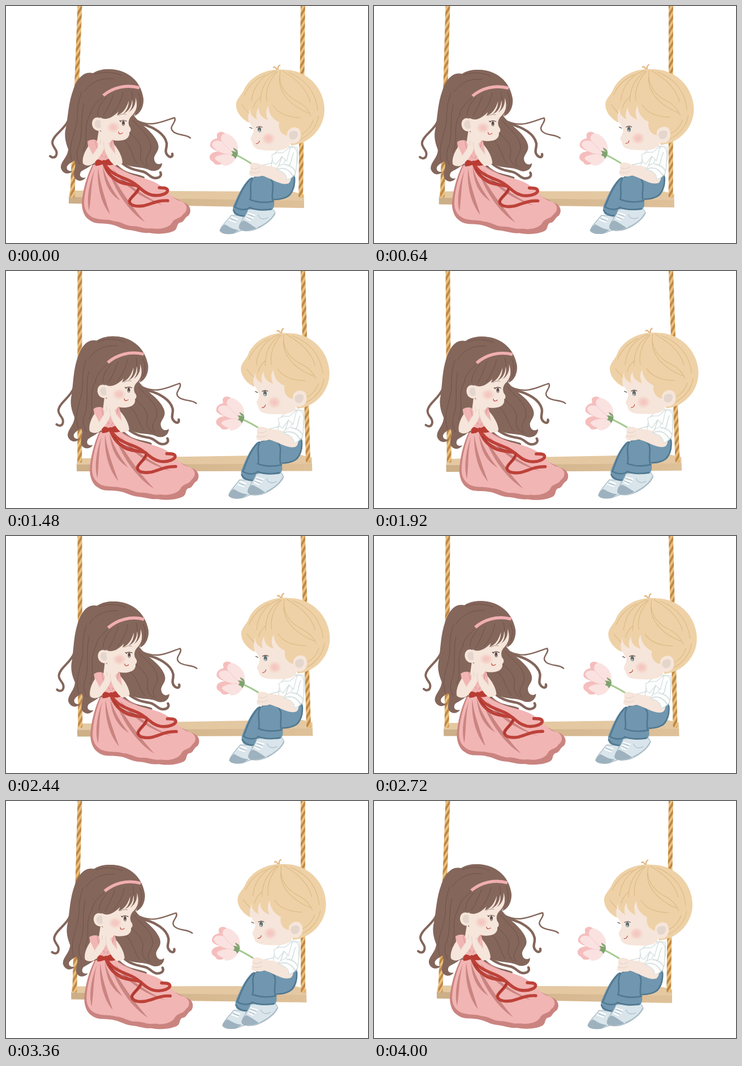
Recreate the animation shown at these times as an HTML page. Size 640 by 420 pixels, loop 4.04 s.

```html
<!DOCTYPE html>
<html lang="en">
<head>
<meta charset="utf-8">
<title>Two children on a swing</title>
<style>
html, body { margin: 0; width: 100%; height: 100%; overflow: hidden; background: #fff; }
svg { display: block; }
path, ellipse { fill: none; stroke-linecap: round; stroke-linejoin: round; }
.skin { fill: #f6e5da; }
.ear { fill: #e4d6cc; }
.line { stroke: #dfcabf; stroke-width: .8; }
.hair { fill: #84665b; }
.lock { stroke: #84665b; stroke-width: 3.4; }
.strand { stroke: #6d5047; stroke-width: .9; }
.dress { fill: #f1b5b4; }
.fold { fill: #ca8480; }
.red { fill: #b93c33; }
.ribbon { stroke: #bd4239; stroke-width: 5.4; }
.blond { fill: #eed1a6; }
.wisp { stroke: #d9b780; stroke-width: 1; }
.shirt { fill: #fdfefe; stroke: #d9e2e1; stroke-width: 1.4; }
.jeans { fill: #7097af; }
.seam { stroke: #517891; stroke-width: 2.6; }
.shoe { fill: #d9e5eb; stroke: #9db0bb; stroke-width: 1; }
.sole { fill: #9db2be; }
.petal { fill: #fae2e1; }
.rose { fill: #f5bebd; }
.eye { stroke: #54423d; stroke-width: 1.2; }
.mouth { stroke: #c44540; stroke-width: 1.2; }
</style>
</head>
<body>
<svg width="640" height="420" viewBox="0 0 640 420">
<defs>
  <pattern id="twist" width="9" height="15" patternUnits="userSpaceOnUse">
    <path d="M0 0H9V15H0Z" style="fill:#e4b56c"/>
    <path d="M-9 15L0 0M-4.5 22.5L13.5 -7.5M4.5 22.5L18 0" style="stroke:#bd8545;stroke-width:3.4"/>
    <path d="M-6 17L5 -1M3 17L14 -1" style="stroke:#efcb8e;stroke-width:1.3"/>
  </pattern>
  <radialGradient id="blush">
    <stop offset="0" stop-color="#f2aeaa" stop-opacity=".62"/>
    <stop offset=".5" stop-color="#f2b4af" stop-opacity=".45"/>
    <stop offset="1" stop-color="#f6d0c8" stop-opacity="0"/>
  </radialGradient>
  <linearGradient id="plank">
    <stop offset="0" stop-color="#ccae87"/>
    <stop offset="1" stop-color="#dfc199"/>
  </linearGradient>
</defs>

<g class="body">
  <path style="fill:#e4c8a2" d="M113 327L507 329L527 334V346L111 338Z"/>
  <path style="fill:url(#plank)" d="M111 338L527 345V358L111 350Z"/>
</g>

<g id="ropes" stroke="url(#twist)" stroke-width="8">
  <path d="M130.7 -5L117.4 336"/>
  <path d="M525 -5L521.2 336"/>
</g>

<g class="body">
  <!-- girl: hair behind -->
  <path class="lock" style="stroke-width:4" d="M110 203C104 218 84 228 82 241C81 250 92 254 89 264C87 270 81 269 78 266"/>
  <path class="lock" style="stroke-width:2.4" d="M230 202C258 217 279 203 298 198C303 206 285 214 296 223C305 230 319 227 326 234"/>
  <path class="lock" style="stroke-width:4.4" d="M236 208C262 214 281 227 284 243C285 252 279 258 286 265C290 269 295 268 294 262"/>
  <path class="lock" style="stroke-width:4.4" d="M205 278C219 290 232 291 240 293C252 295 254 305 264 305C271 305 276 301 273 295"/>
  <path class="lock" style="stroke-width:4" d="M196 283C212 300 229 298 243 304"/>
  <path class="hair" d="M181 112C169 112 160 115 154 119C137 115 126 129 119 148C110 172 110 195 106 215C102 231 106 243 110 254C109 268 96 276 97 287C100 298 112 300 118 292C111 294 106 290 108 284C112 278 117 277 121 274C126 284 117 295 121 304C126 312 136 311 141 304C132 306 128 300 133 293C139 289 145 287 151 282L206 278C222 288 238 284 252 290C263 296 276 290 276 278C268 284 261 277 262 268C265 259 273 255 268 242C260 222 240 213 226 194L242 170C238 132 214 112 181 112Z"/>
  <path class="strand" d="M155 120C134 142 126 168 126 198C124 225 108 246 116 274M145 155C127 188 139 222 128 250C123 263 126 272 130 280M150 190C134 215 148 234 136 258M224 202C240 222 255 230 256 250C255 266 240 270 252 285M214 220C230 235 242 246 238 262C235 272 242 280 248 284M207 236C222 248 222 266 232 280"/>

  <!-- girl: head -->
  <path class="skin" d="M164 220L188 236L192 258H158Z"/>
  <path class="skin" d="M166 194C174 176 205 158 230 160C235 175 230 188 221 196C216 202 216 208 218 213C222 218 221 222 218 224C219 231 214 237 205 238C190 241 174 234 168 222Z"/>
  <ellipse cx="190" cy="215" rx="13" ry="11" style="fill:url(#blush)"/>
  <path class="skin" d="M170 202C163 194 152 197 152 209C153 220 163 224 171 219Z"/>
  <path class="ear" d="M167 203C160 199 156 205 157 211C159 217 164 218 168 215Z"/>
  <path class="eye" d="M202 204Q207 201 213 204M201 203L203 205"/>
  <ellipse cx="207.5" cy="208" rx="2.4" ry="4.4" style="fill:#5c4a47"/>
  <ellipse cx="207.5" cy="210.5" rx="1.4" ry="1.6" style="fill:#b2aca0"/>
  <path style="stroke:#a58a7e;stroke-width:.9" d="M199 194Q205 190 212 192"/>
  <path class="mouth" d="M199 223C199 228 203 227 206 225"/>
  <path class="hair" d="M166 197C176 204 188 198 199 187L196 194C207 190 213 181 217 168C217 177 214 185 207 191C217 187 222 178 223 166C225 175 222 183 217 188C225 183 230 174 229 162C233 173 231 184 227 195C239 190 244 176 243 164C238 130 212 112 181 112C158 112 138 125 134 150C133 175 145 190 166 197Z"/>
  <path class="strand" d="M157 121C172 115 190 117 204 123M139 151C151 133 171 127 190 129M171 162C157 172 151 181 149 191M177 162C168 172 162 181 162 193M190 157C184 172 179 184 172 194M207 153C204 168 197 181 187 192M222 151C223 157 224 160 223 166M234 153C239 163 238 175 234 184"/>
  <path d="M172 158.5C188 145 212 138 236 145" style="stroke:#f1aeb1;stroke-width:5.4;stroke-linecap:butt"/>

  <!-- girl: dress -->
  <path class="dress" d="M144 240C149 236 156 236 160 238L169 258L185 240L189 236L196 264L188 279H157L147 262Z"/>
  <path style="stroke:#d7918e;stroke-width:1" d="M158 238C159 250 163 260 171 267M188 238C185 252 181 261 175 269"/>
  <path class="fold" d="M153 281C143 301 136 325 134 348C134 363 139 374 147 379C158 388 172 384 185 387C197 389 205 396 218 397C230 398 239 403 253 402C267 405 287 404 298 398C304 394 301 387 307 384C315 384 315 375 323 371C329 362 326 351 311 347L190 281Z"/>
  <path class="dress" d="M155 281C146 302 139 326 138 348C138 361 144 370 154 375C168 380 178 377 190 381C204 382 210 389 222 390C236 389 244 396 258 394C273 397 290 392 294 383C299 375 309 377 313 369C323 362 321 350 309 346C293 342 289 328 268 315C247 302 211 301 190 281Z"/>
  <path class="fold" d="M157 289C146 316 142 345 147 363C151 338 150 314 157 289ZM163 286C160 317 168 350 184 369C176 343 166 316 163 286ZM171 284C173 310 180 331 202 345C188 327 177 306 171 284ZM180 287C190 324 218 366 246 383C223 357 200 323 180 287ZM188 288C206 315 235 340 278 353C247 339 215 317 188 288Z"/>
  <path class="ribbon" d="M173 279C178 294 185 303 199 311C213 318 232 316 235 321C235 330 219 339 218 346C219 354 231 356 243 354C257 351 267 344 286 345"/>
  <path class="ribbon" d="M175 281C185 298 202 302 219 310C236 318 241 331 258 335C274 338 289 331 285 325C283 322 277 322 271 322"/>
  <path style="stroke:#922d28;stroke-width:1" d="M177 288C187 304 202 309 218 314M235 322C229 334 217 341 219 349"/>
  <path class="red" d="M172 276C166 271 160 271 156 274C159 278 157 281 158 283C164 284 169 281 173 279C178 283 184 283 190 281C187 277 188 274 187 271C181 270 177 272 172 276Z"/>
  <ellipse class="red" cx="173" cy="277" rx="3.5" ry="4"/>

  <!-- girl: arms -->
  <path class="skin" d="M146 248C140 256 134 269 136 279C140 284 150 284 156 278C163 270 171 262 174 250C178 241 175 236 172 238L169 231C165 235 164 243 162 250L153 263Z"/>
  <path class="skin" d="M191 245C198 253 206 267 206 278C202 284 192 283 187 278C179 268 173 258 173 245C176 235 181 235 182 242L185 251L193 261Z"/>
  <path class="line" d="M162 251L153 264M173 240C172 250 175 260 181 269M181 243L185 252L193 262M167 237L167 245"/>

  <!-- boy: torso -->
  <path class="shirt" d="M476 260C488 249 504 247 515 251C518 268 512 288 510 307L474 305C467 293 467 274 476 260Z"/>
  <path class="jeans" d="M476 302C489 305 502 303 510 300C512 311 510 325 503 335C495 343 482 344 470 343L433 340L440 304C455 298 470 299 476 302Z"/>
  <path class="seam" d="M510 304C511 318 507 329 500 336C492 342 482 343 474 343"/>

  <!-- boy: legs and shoes -->
  <path class="shoe" d="M398 371C390 381 379 391 378 398C380 403 392 405 402 403L425 395L418 372Z"/>
  <path class="sole" d="M378 398C380 393 383 389 387 387C394 391 401 396 412 397L402 403C391 406 380 403 378 398Z"/>
  <path class="jeans" d="M431 305C417 318 409 338 402 354C400 360 402 366 404 369C412 374 421 374 427 373L447 325Z"/>
  <path class="seam" d="M434 305C419 318 411 340 405 355M404 356C412 361 421 362 429 359M402 362C407 372 419 373 427 372"/>
  <path class="shoe" d="M428 361C424 374 412 383 412 393C414 400 430 400 441 396C456 390 472 378 476 367C474 361 470 358 466 357Z"/>
  <path class="sole" d="M412 393C412 387 416 382 420 380C428 383 435 389 443 394C431 399 415 400 412 393Z"/>
  <path style="stroke:#a9bcc7;stroke-width:2" d="M445 393C458 387 470 378 475 368"/>
  <path style="stroke:#fff;stroke-width:2.2" d="M428 367L440 371M426 372L437 376M424 376L432 380M399 374L409 378M395 379L406 383"/>
  <path style="stroke:#8fa4b1;stroke-width:.8" d="M428 369L438 373M425 374L434 378M397 377L407 381M446 370C447 377 456 380 463 375"/>
  <path class="jeans" d="M437 304C453 296 470 301 473 313C475 326 471 340 474 348C475 356 472 361 468 362C455 363 440 362 430 359C428 354 429 347 431 341C435 326 429 315 437 304Z"/>
  <path class="seam" d="M436 305C429 317 435 328 432 342M440 303C457 297 472 303 472 318C472 328 469 337 472 346M431 343C443 348 459 349 473 346M430 357C442 362 457 362 469 360"/>

  <!-- boy: flower and arm -->
  <path d="M405 263C415 268 425 273 436 281" style="stroke:#a3c98d;stroke-width:3"/>
  <path class="rose" d="M398 242C392 223 378 219 373 227C371 240 385 252 403 262ZM384 236C372 231 359 238 361 249C368 258 388 262 402 262ZM397 262C381 254 361 257 360 267C359 275 368 275 368 279C375 286 395 276 402 264Z"/>
  <path class="petal" d="M404 262C393 254 383 246 380 236C379 227 387 224 393 227C406 234 413 246 409 259Z"/>
  <path class="petal" d="M403 263C384 264 368 256 364 246C365 237 377 237 386 242C394 248 400 255 403 263Z"/>
  <path class="petal" d="M403 263C387 260 372 264 369 270C373 277 381 276 384 283C396 284 407 275 407 264Z"/>
  <path style="stroke:#f4cfce;stroke-width:1" d="M381 239C388 248 396 256 403 262M371 267C382 262 394 262 403 263"/>
  <path style="fill:#7fa36f" d="M411 261C406 257 402 256 402 251C406 254 410 254 410 261C409 266 407 269 405 271C404 267 402 266 398 265C402 262 401 260 398 257C403 257 407 258 411 261Z"/>
  <path class="skin" d="M432 280C437 276 445 278 450 281L468 284L496 291C505 299 506 308 500 314C487 320 469 305 453 301C443 304 432 303 430 298C429 294 433 291 432 287Z"/>
  <path class="line" d="M433 287C439 290 444 289 449 285M432 294C438 297 445 296 449 293"/>
  <path class="shirt" d="M505 250C513 250 516 258 514 269C514 279 513 291 512 296C507 303 500 309 496 307C497 300 490 293 478 290C479 285 485 281 491 280C496 270 497 256 505 250Z"/>
  <path class="shirt" style="stroke-width:2.2" d="M480 289C490 286 500 288 507 301M493 281C502 282 510 287 512 295"/>
  <path class="shirt" d="M470 264L479 260L490 260L503 249L496 275L488 267L477 281L472 277Z"/>
  <path style="stroke:#c9d5d4;stroke-width:1.2" d="M488 267L482 283M471 278L454 282M509 260C503 269 506 278 500 283"/>

  <!-- boy: head -->
  <path class="wisp" d="M480 114C477 109 475 107 473 109M481 114C480 108 482 106 484 105" style="stroke:#e3b985;stroke-width:2.4"/>
  <path class="blond" d="M490 113C527 112 561 140 563 182C564 217 535 245 504 247L480 185Z"/>
  <path class="skin" d="M427 180L425 202C432 205 433 211 437 217C439 223 435 229 433 233C431 238 436 240 436 245C438 254 451 256 466 256C481 257 493 256 501 248L508 205L475 165Z"/>
  <ellipse cx="464" cy="235" rx="13" ry="12" style="fill:url(#blush)"/>
  <path class="blond" d="M407 172C405 185 415 200 430 207C426 199 429 188 432 180C430 190 435 197 444 201C441 193 443 186 447 180C446 191 452 198 463 202C459 193 459 184 464 177C464 189 470 200 483 206C480 218 487 229 499 230L521 217L536 170L493 113C457 109 429 128 420 150C416 158 409 163 407 172Z"/>
  <path class="skin" d="M497 224C501 215 512 212 518 218C524 226 521 240 512 243C505 245 497 243 497 236Z"/>
  <path class="ear" d="M501 225C506 220 515 220 516 226C516 233 512 237 506 237C501 236 499 231 501 225Z"/>
  <path class="wisp" d="M476 115C453 123 437 142 434 168M480 116C465 132 458 151 461 168M478 116C458 130 450 149 450 170M485 115C480 138 493 158 515 169C528 176 535 184 539 195M489 115C506 126 531 142 538 171M500 118C530 130 548 153 551 185M484 125C480 149 499 175 535 190M472 176C480 190 498 197 520 198M421 158C430 140 442 129 458 122M417 175C422 183 427 187 429 190M553 195C550 214 536 229 521 236M543 203C538 216 531 223 522 227M437 181C440 171 445 165 451 161"/>
  <path class="eye" d="M443 215Q449 212 453 215M431 215L435 217"/>
  <ellipse cx="448" cy="219" rx="3" ry="4.6" style="fill:#5f6d73"/>
  <ellipse cx="447.5" cy="221.5" rx="1.7" ry="1.8" style="fill:#b9c5c6"/>
  <path class="mouth" d="M442 244C445 244 448 242 448 239"/>
</g>
</svg>
<script>
const LOOP = 4040, STEP = 40;
const bodies = document.querySelectorAll('.body');
const ropes = document.getElementById('ropes');
const setMatrix = (el, ...m) => el.setAttribute('transform', `matrix(${m.join(' ')})`);

function draw(now) {
  const t = Math.floor(now % LOOP / STEP) * STEP;
  const q = Math.sin(Math.PI * t / LOOP) ** 2;
  // Ropes lean from the top edge; riders shift and tilt with the seat.
  setMatrix(ropes, 1, 0, .046 * q, 1, 0, 0);
  for (const el of bodies) setMatrix(el, 1, -.025 * q, .0385 * q, 1, 3.5 * q, 8.9 * q);
  requestAnimationFrame(draw);
}
draw(performance.now());
</script>
</body>
</html>
```
